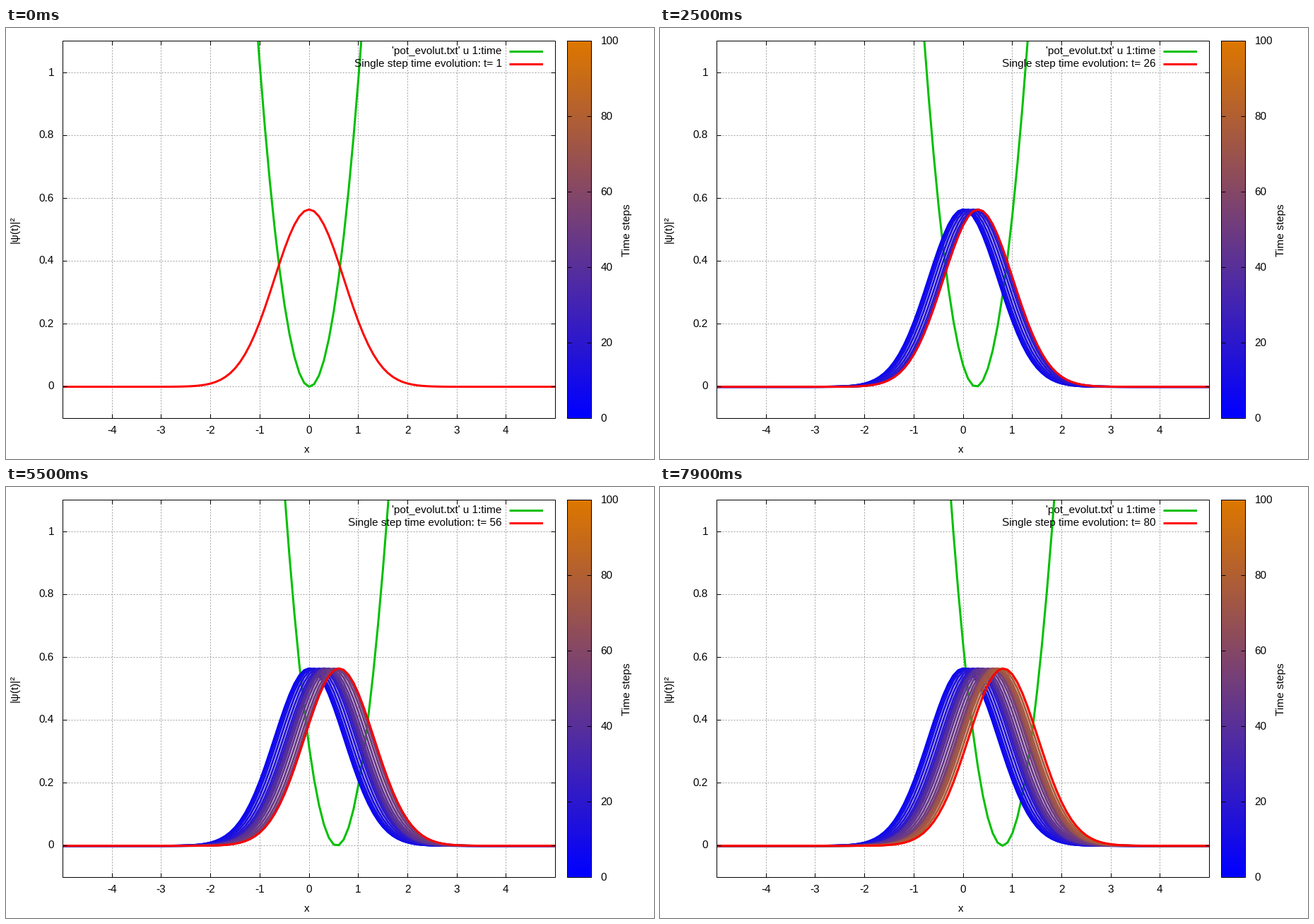
These frames come from a looping animation (917 by 611 pixels, 8 s). A matplotlib script:

```python
import matplotlib.pyplot as plt
import numpy as np
from matplotlib.animation import FuncAnimation
from matplotlib.colors import LinearSegmentedColormap
from matplotlib.patches import Rectangle

W, H, DPI = 917, 611, 64
PX = 72 / DPI                                  # points per pixel
LEFT, RIGHT, TOP, BOTTOM = 80.5, 777.5, 18.5, 553.5
BAR_L, BAR_R = 794.5, 828.5
STEPS, FIRST, STRIDE = 80, 2, 3
GREEN, RED = "#00c000", "#ff0000"

plt.rcParams["font.family"] = ["Liberation Sans", "DejaVu Sans"]
plt.rcParams["font.size"] = 15.33 * PX
plt.rcParams["text.hinting"] = "native"
plt.rcParams["path.snap"] = False              # positions are pixel centres

fig = plt.figure(figsize=(W / DPI, H / DPI), dpi=DPI, facecolor="white")
ax = fig.add_axes([0, 0, 1, 1])
palette = LinearSegmentedColormap.from_list("steps", ["#0000ff", "#dd7700"])


def sx(x):
    return 429 + 69.7 * np.asarray(x)


def sy(y):
    return 508.6 - 445.5 * np.asarray(y)


def centre(v):
    """Middle of the pixel that holds v."""
    return float(np.floor(v)) + 0.5


def line(xs, ys, color="black", width=1, z=6, **kw):
    return ax.plot(xs, ys, color=color, lw=width * PX, zorder=z, **kw)[0]


def label(x, y, s, ha="left", z=6, **kw):
    return ax.text(x, y, s, ha=ha, va=kw.pop("va", "baseline"), zorder=z, **kw)


def box(x0, y0, x1, y1):
    line([x0, x1, x1, x0, x0], [y0, y0, y1, y1, y0],
         solid_joinstyle="miter", solid_capstyle="projecting")


def ticks(x=None, y=None, lo=0, hi=0, size=6):
    """Inward tick marks on both opposite sides."""
    for a, b in ((lo, lo + size), (hi, hi - size)):
        if y is None:
            line([x, x], [a, b], solid_capstyle="butt")
        else:
            line([a, b], [y, y], solid_capstyle="butt")


# Colour bar
ax.imshow(np.linspace(1, 0, 256)[:, None], cmap=palette, aspect="auto",
          extent=(BAR_L, BAR_R, BOTTOM, TOP), zorder=1)
box(BAR_L, TOP, BAR_R, BOTTOM)
for v in range(0, 101, 20):
    y = centre(BOTTOM - 0.5 - (BOTTOM - TOP) * v / 100)
    label(841.5, y + 4.5, str(v))
    if 0 < v < 100:
        ticks(y=y, lo=BAR_L, hi=BAR_R)
label(879, 286.5, "Time steps", "center", va="center", rotation=90)

# Grid, ticks and axis labels
grid = dict(color="#a0a0a0", z=0, dashes=(2, 2), dash_capstyle="butt")
for v in range(-4, 5):
    x = centre(sx(v))
    line([x, x], [BOTTOM, TOP], **grid)
    ticks(x=x, lo=TOP, hi=BOTTOM)
    label(x - 0.5, 575, str(v), "center")
for v in np.arange(6) / 5:
    y = centre(sy(v))
    line([LEFT, RIGHT], [y, y], **grid)
    ticks(y=y, lo=LEFT, hi=RIGHT)
    label(68, y + 4, f"{v:g}", "right")
box(LEFT, TOP, RIGHT, BOTTOM)
label(426, 601.5, "x", "center")
label(13, 286, "|ψ(t)|²", "center", va="center", rotation=90)

# Key
label(701.5, 37.5, "'pot_evolut.txt' u 1:time", "right", z=1)
title = label(702, 55.5, "", "right", z=5)
for y, c in ((33.5, GREEN), (51.5, RED)):
    line([712.5, 760], [y, y], c, 3, solid_capstyle="butt")

# Curves, sampled on a coarse grid
xs = np.linspace(-5, 5, 101)


def well(t):
    return sy((xs - 0.01 * t) ** 2)


def density(t):
    """Ground state dragged along by the moving harmonic well."""
    mid = 0.01 * t - 0.05 * np.sin(0.2 * t)
    return sy(np.exp(-(xs - mid) ** 2) / np.sqrt(np.pi))


potential = line(sx(xs), well(1), GREEN, 3, z=2)
packet = line(sx(xs), density(1), RED, 3, z=4)
trail = [(s, line(sx(xs), density(s), palette(s / 100), 3, z=3))
         for s in range(FIRST, STEPS + 1, STRIDE)]

frame = Rectangle((LEFT, TOP), RIGHT - LEFT, BOTTOM - TOP,
                  transform=ax.transData)
for curve in [potential, packet] + [c for _, c in trail]:
    curve.set_clip_path(frame)

ax.set_xlim(0, W)
ax.set_ylim(H, 0)
ax.axis("off")


def update(i):
    t = i + 1
    potential.set_ydata(well(t))
    packet.set_ydata(density(t))
    title.set_text(f"Single step time evolution: t= {t}")
    for s, curve in trail:
        curve.set_visible(s <= t)
    return []


anim = FuncAnimation(fig, update, frames=STEPS, interval=100,
                     repeat=True, repeat_delay=0, blit=False)
plt.show()
```
